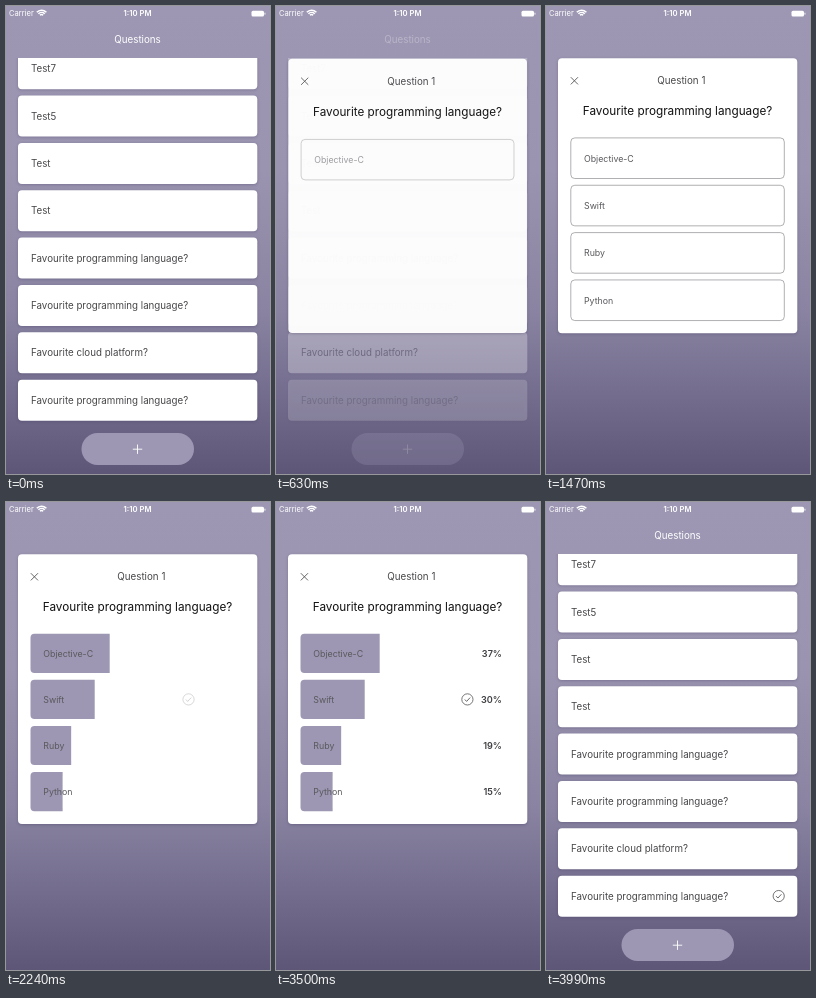
Write an HTML page with a canvas that moves like this. It is 264 by 468 pixels and loops after 4.62 s.

```html
<!DOCTYPE html>
<html lang="en">
<head>
<meta charset="utf-8">
<title>Questions</title>
<style>
  html, body { margin: 0; width: 100%; height: 100%; overflow: hidden; background: #9d97b3; }
  canvas { display: block; width: 264px; height: 468px; }
</style>
</head>
<body>
<canvas id="stage"></canvas>
<script>
const W = 264, H = 468, LOOP = 4620, STEP = 70;
const LILAC = '#9d97b3', INK = '#474649';
const FONT = 'Inter, "Open Sans", sans-serif';
const ROW_PITCH = 47.35;
const OPEN = 280, CLOSE = 3500, TRANSITION = 490;
const rows = ['Test7', 'Test5', 'Test', 'Test',
  'Favourite programming language?', 'Favourite programming language?',
  'Favourite cloud platform?', 'Favourite programming language?'];
const options = [['Objective-C', 37], ['Swift', 30], ['Ruby', 19], ['Python', 15]];

const dpr = window.devicePixelRatio || 1;
const stage = document.getElementById('stage');
const layer = document.createElement('canvas');
for (const c of [stage, layer]) {
  c.width = Math.round(W * dpr);
  c.height = Math.round(H * dpr);
}
const screen = stage.getContext('2d');
const layerCtx = layer.getContext('2d');
let g = screen;

const span = (t, from, to) => Math.min(1, Math.max(0, (t - from) / (to - from)));
const smooth = x => x * x * (3 - 2 * x);
const easeOut = (x, power) => 1 - (1 - x) ** power;
const mix = (a, b, k) => a + (b - a) * k;

function text(str, x, y, size, color = INK, align = 'left', weight = 400) {
  g.font = `${weight} ${size}px ${FONT}`;
  g.fillStyle = color;
  g.textAlign = align;
  g.textBaseline = 'alphabetic';
  g.fillText(str, x, y + size * 0.36);
}

function box(x, y, w, h, radius, fill) {
  g.beginPath();
  g.roundRect(x, y, w, h, radius);
  g.fillStyle = fill;
  g.fill();
}

function panel(x, y, w, h) {
  g.save();
  g.shadowColor = 'rgba(50,40,80,.3)';
  g.shadowBlur = 3 * dpr;
  g.shadowOffsetY = 0.8 * dpr;
  box(x, y, w, h, 4, '#fff');
  g.restore();
}

function strokeLine(color, width, ...points) {
  g.beginPath();
  points.forEach(([x, y], i) => i ? g.lineTo(x, y) : g.moveTo(x, y));
  g.strokeStyle = color;
  g.lineWidth = width;
  g.stroke();
}

function faded(alpha, draw) {
  g.save();
  g.globalAlpha *= alpha;
  draw();
  g.restore();
}

// Draws onto a separate layer so that the group fades as a whole.
function group(alpha, scale, draw) {
  if (alpha <= 0) return;
  g = layerCtx;
  g.setTransform(dpr, 0, 0, dpr, 0, 0);
  g.clearRect(0, 0, W, H);
  g.translate(W / 2, H / 2);
  g.scale(scale, scale);
  g.translate(-W / 2, -H / 2);
  draw();
  g = screen;
  faded(alpha, () => g.drawImage(layer, 0, 0, W, H));
}

function tick(x, y) {
  g.beginPath();
  g.arc(x, y, 5.6, 0, Math.PI * 2);
  g.strokeStyle = '#555';
  g.lineWidth = 0.8;
  g.stroke();
  strokeLine('#555', 0.9, [x - 2.6, y + 0.1], [x - 0.8, y + 2], [x + 2.7, y - 1.8]);
}

function background() {
  const sky = g.createLinearGradient(0, 0, 0, H);
  [[0, LILAC], [0.35, '#9a94b0'], [0.65, '#8a84a2'], [0.85, '#716a8b'], [1, '#5d5677']]
    .forEach(([at, color]) => sky.addColorStop(at, color));
  g.fillStyle = sky;
  g.fillRect(0, 0, W, H);
}

function statusBar() {
  text('Carrier', 3, 7.5, 7.6, '#fff');
  for (const r of [2.2, 4.4, 6.6]) {
    g.beginPath();
    g.arc(35.6, 10.8, r, -Math.PI * 0.76, -Math.PI * 0.24);
    g.strokeStyle = '#fff';
    g.lineWidth = 1.5;
    g.stroke();
  }
  text('1:10 PM', 131.5, 7.5, 7.7, '#fff', 'center', 600);
  box(245.5, 4.8, 12.5, 5.6, 1.5, '#fff');
  box(258.5, 6.5, 0.9, 2.2, 0.4, '#fff');
}

function list(t) {
  const answered = t >= CLOSE;
  const pressed = answered ? 0 : span(t, 210, 420);
  text('Questions', 131.5, 33.3, 9.8, '#fff', 'center');
  g.save();
  g.beginPath();
  g.rect(0, 52, W, 370);
  g.clip();
  rows.forEach((label, i) => {
    const y = 42.2 + i * ROW_PITCH;
    const last = i === rows.length - 1;
    faded(last ? 1 - 0.38 * pressed : 1, () => {
      panel(12, y, 239.3, 41);
      text(label, 25, y + 20.6, 9.75);
      if (last && answered) tick(232.7, y + 20.4);
    });
  });
  g.restore();
  box(75.5, 427, 112.5, 32, 16, LILAC);
  strokeLine('#fff', 0.9, [126.8, 443.2], [136.2, 443.2]);
  strokeLine('#fff', 0.9, [131.5, 438.5], [131.5, 447.9]);
}

function option(label, percent, i, t) {
  const enter = span(t, 500 + i * 250, 720 + i * 250);
  if (enter <= 0) return;
  const change = smooth(span(t, 1900, 2180));
  const grow = easeOut(span(t, 1900, 2220), 2.5);
  const y = mix(131.9 + i * ROW_PITCH, 131.7 + i * 46.1, change) + 18 * (1 - enter) ** 3;
  const h = mix(40.6, 39.2, change);

  faded(enter, () => {
    if (t > 1900) box(24.5, y, 214 * percent / 100 * grow, h, [4, 0, 0, 4], LILAC);
    faded(1 - change, () => {
      g.beginPath();
      g.roundRect(24.8, y, 213.5, h, 4);
      g.strokeStyle = '#8f8f93';
      g.lineWidth = 0.7;
      g.stroke();
    });
    text(label, mix(38, 37.3, change), y + h / 2 + 0.2, 8.8, '#59585c');
  });

  const shown = span(t, 2380, 2730);
  const slide = -12 * (1 - easeOut(shown, 3));
  faded(shown, () =>
    text(percent + '%', 226 + slide, y + h / 2 + 0.2, 9.1, '#3f3e42', 'right', 600));
  if (label === 'Swift') {
    const k = span(t, 2130, 2520);
    faded(k, () => tick(191.4 - 24 * (1 - k) ** 3, y + h / 2));
  }
}

function card(t) {
  panel(12, 52.3, 239.3, mix(275, 269.8, smooth(span(t, 1900, 2180))));
  strokeLine('#555', 0.9, [24.8, 71.2], [32, 78.4]);
  strokeLine('#555', 0.9, [32, 71.2], [24.8, 78.4]);
  text('Question 1', 135.3, 74.8, 9.8, INK, 'center');
  text('Favourite programming language?', 131.5, 105, 11.75, '#111', 'center');
  options.forEach(([label, percent], i) => option(label, percent, i, t));
}

function draw(t) {
  g = screen;
  g.setTransform(dpr, 0, 0, dpr, 0, 0);
  background();
  statusBar();
  const opening = span(t, OPEN, OPEN + TRANSITION);
  const closing = span(t, CLOSE, CLOSE + TRANSITION);
  const listAlpha = 1 - opening + closing ** 1.2;
  const cardAlpha = easeOut(opening, 2.7) - easeOut(closing, 4.4);
  const cardScale = 0.8 + 0.2 * (easeOut(opening, 3.4) - easeOut(closing, 3));
  group(listAlpha, 1, () => list(t));
  group(cardAlpha, cardScale, () => card(t));
}

const start = performance.now();
function loop() {
  const t = (performance.now() - start) % LOOP;
  draw(Math.min(3990, Math.floor(t / STEP) * STEP));
  requestAnimationFrame(loop);
}
loop();
</script>
</body>
</html>
```
